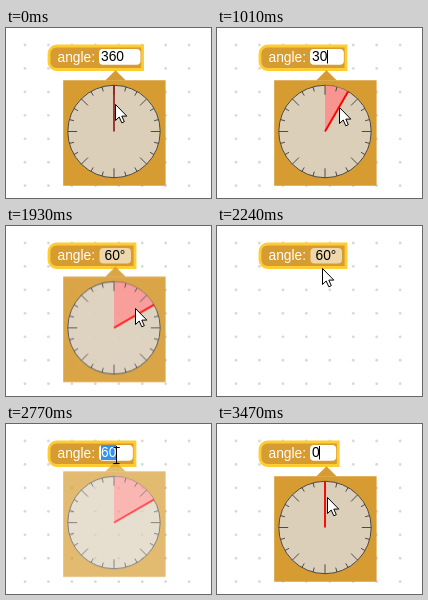
An HTML page with a canvas that plays this animation: 205x170 px, repeating every 3.54 s.

```html
<!DOCTYPE html>
<html lang="en">
<head>
<meta charset="utf-8">
<title>Angle field</title>
<style>
  html, body { margin: 0; width: 100%; height: 100%; overflow: hidden; background: #fff; }
  canvas { display: block; width: 100%; height: 100%; }
</style>
</head>
<body>
<canvas id="stage"></canvas>
<script>
const W = 205, H = 170, LOOP = 3540, FPS = 13;
const ORANGE = '#d69b31', YELLOW = '#fc3', FONT = '13.8px "Liberation Sans", Arial, sans-serif';
const DIGIT = 7.67, GRID = 23.45;
const DIAL = { x: 108, y: 103.5, r: 46.2 };

// Milliseconds: the field takes 60, closes, then opens again.
const SIXTY = 1760, CLOSE = 1910, OPEN = 2658, FADE = 250;

// Where the pointer turns or rests: step, x, y.
const PATH = [[1, 109, 76], [8, 116, 77], [9, 116, 77], [13, 122, 79], [14, 122, 79],
  [18, 129, 82], [25, 129, 82], [29, 105, 42], [36, 110, 31], [45, 110, 73]];

const stage = document.getElementById('stage');
const layer = document.createElement('canvas');
const screen = stage.getContext('2d'), panel = layer.getContext('2d');

function fit() {
  const ratio = window.devicePixelRatio || 1;
  for (const c of [stage, layer]) {
    c.width = Math.round(innerWidth * ratio);
    c.height = Math.round(innerHeight * ratio);
    c.getContext('2d').setTransform(c.width / W, 0, 0, c.height / H, 0, 0);
  }
}

const clamp = u => Math.min(1, Math.max(0, u));
const polar = (angle, r) => [DIAL.x + r * Math.cos(angle), DIAL.y + r * Math.sin(angle)];
const radians = degrees => degrees * Math.PI / 180;

function pointerAt(step) {
  const i = Math.max(1, PATH.findIndex(p => p[0] >= step));
  const [s0, x0, y0] = PATH[i - 1], [s1, x1, y1] = PATH[i];
  const u = clamp((step - s0) / (s1 - s0));
  return { x: Math.round(x0 + (x1 - x0) * u), y: Math.round(y0 + (y1 - y0) * u) };
}

function valueAt(t, { x, y }) {
  if (t >= SIXTY) return t > OPEN && y > DIAL.y - DIAL.r ? 0 : 60;
  const degrees = Math.atan2(x - DIAL.x, DIAL.y - y) * 180 / Math.PI;
  return Math.round(degrees / 15) * 15 || 360;
}

function panelOpacity(t) {
  const ease = start => 1 - (1 - clamp((t - start) / FADE)) ** 2;
  return t < OPEN ? 1 - ease(CLOSE) : ease(OPEN);
}

function trace(g, points) {
  g.beginPath();
  points.forEach(([x, y]) => g.lineTo(x, y));
}

function box(g, x, y, w, h, radii, fill) {
  g.beginPath();
  g.roundRect(x, y, w, h, radii);
  g.fillStyle = fill;
  g.fill();
}

function label(g, text, x, y, color) {
  g.font = FONT;
  g.fillStyle = color;
  g.fillText(text, x, y);
}

function drawDots(g) {
  g.fillStyle = '#d9d9d9';
  for (let y = 17; y < H - 5; y += GRID) {
    for (let x = 19; x < W - 5; x += GRID) {
      g.beginPath();
      g.arc(x, y, 1.4, 0, 7);
      g.fill();
    }
  }
}

function drawBlock(g, value, editing, selected) {
  const text = String(value), width = text.length * DIGIT;
  const right = editing ? 115 + width : 130.4;
  box(g, 43, 18, right - 44.4, 23.5, [7.5, 0, 0, 7.5], ORANGE);
  g.strokeStyle = YELLOW;
  g.lineWidth = 2.8;
  g.stroke();
  label(g, 'angle:', 51.5, 34, '#fff');

  if (!editing) {
    box(g, 93.5, 22, 31.5, 15.5, 4, 'rgba(255,255,255,.6)');
    label(g, text + '°', 98.5, 34, '#000');
    return;
  }
  box(g, 93, 21, right - 96.5, 15.7, 4, '#fff');
  if (selected) box(g, 95, 21, width, 15, 0, '#3390f5');
  label(g, text, 95, 33, selected ? '#fff' : '#000');
  if (value < 360) box(g, Math.round(94.5 + width), 22, 1, 13.5, 0, '#000');
}

function drawPanel(g, value) {
  const { x, y, r } = DIAL, top = -Math.PI / 2;
  const turn = radians(value) + top, whole = value === 360;
  g.clearRect(0, 0, W, H);
  box(g, 57.2, 52.3, 102.4, 105.5, 0, ORANGE);
  trace(g, [[99.2, 52.5], [109.5, 42.2], [119.8, 52.5]]);
  g.fill();

  g.beginPath();
  g.arc(x, y, r, 0, Math.PI * 2);
  g.fillStyle = 'rgba(221,221,221,.8)';
  g.fill();
  g.strokeStyle = '#444';
  g.lineWidth = .95;
  g.stroke();

  if (!whole) {
    g.beginPath();
    g.moveTo(x, y);
    g.arc(x, y, r, top, turn);
    g.fillStyle = 'rgba(255,136,136,.8)';
    g.fill();
  }

  g.beginPath();
  for (let a = 0; a < 360; a += 15) {
    g.moveTo(...polar(radians(a), r));
    g.lineTo(...polar(radians(a), r - (a % 45 ? 4.7 : 9.4)));
  }
  g.stroke();

  trace(g, [[x, y], polar(turn, r)]);
  g.strokeStyle = whole ? '#8b1414' : '#f00';
  g.lineWidth = whole ? 1.6 : 1.9;
  g.stroke();
}

function drawPointer(g, { x, y }) {
  g.save();
  g.translate(x + .5, y + .5);
  g.strokeStyle = '#000';
  g.lineWidth = 1;
  g.lineJoin = 'round';
  if (y < 38) {
    trace(g, [[-3, -8], [3, -8], [0, -8], [0, 8], [-3, 8], [3, 8]]);
  } else {
    trace(g, [[0, 0], [0, 16], [3.7, 12.5], [6.3, 18.3], [8.8, 17.2], [6.3, 11.6], [11.3, 11.6]]);
    g.closePath();
    g.fillStyle = '#fff';
    g.fill();
  }
  g.stroke();
  g.restore();
}

function draw(step) {
  const t = step * 1000 / FPS;
  const pointer = pointerAt(step);
  const value = valueAt(t, pointer);
  const opacity = panelOpacity(t);

  screen.fillStyle = '#fff';
  screen.fillRect(0, 0, W, H);
  drawDots(screen);
  drawBlock(screen, value, t < CLOSE || t >= OPEN, t >= OPEN && value === 60);
  if (opacity > 0) {
    drawPanel(panel, value);
    screen.globalAlpha = opacity;
    screen.drawImage(layer, 0, -16 * (1 - opacity), W, H);
    screen.globalAlpha = 1;
  }
  drawPointer(screen, pointer);
}

function tick() {
  const t = performance.now() % LOOP;
  // The small lead absorbs rounding at the edge of a step.
  draw(Math.min(45, Math.floor(t * FPS / 1000 + .05)));
  requestAnimationFrame(tick);
}

addEventListener('resize', fit);
fit();
tick();
</script>
</body>
</html>
```
